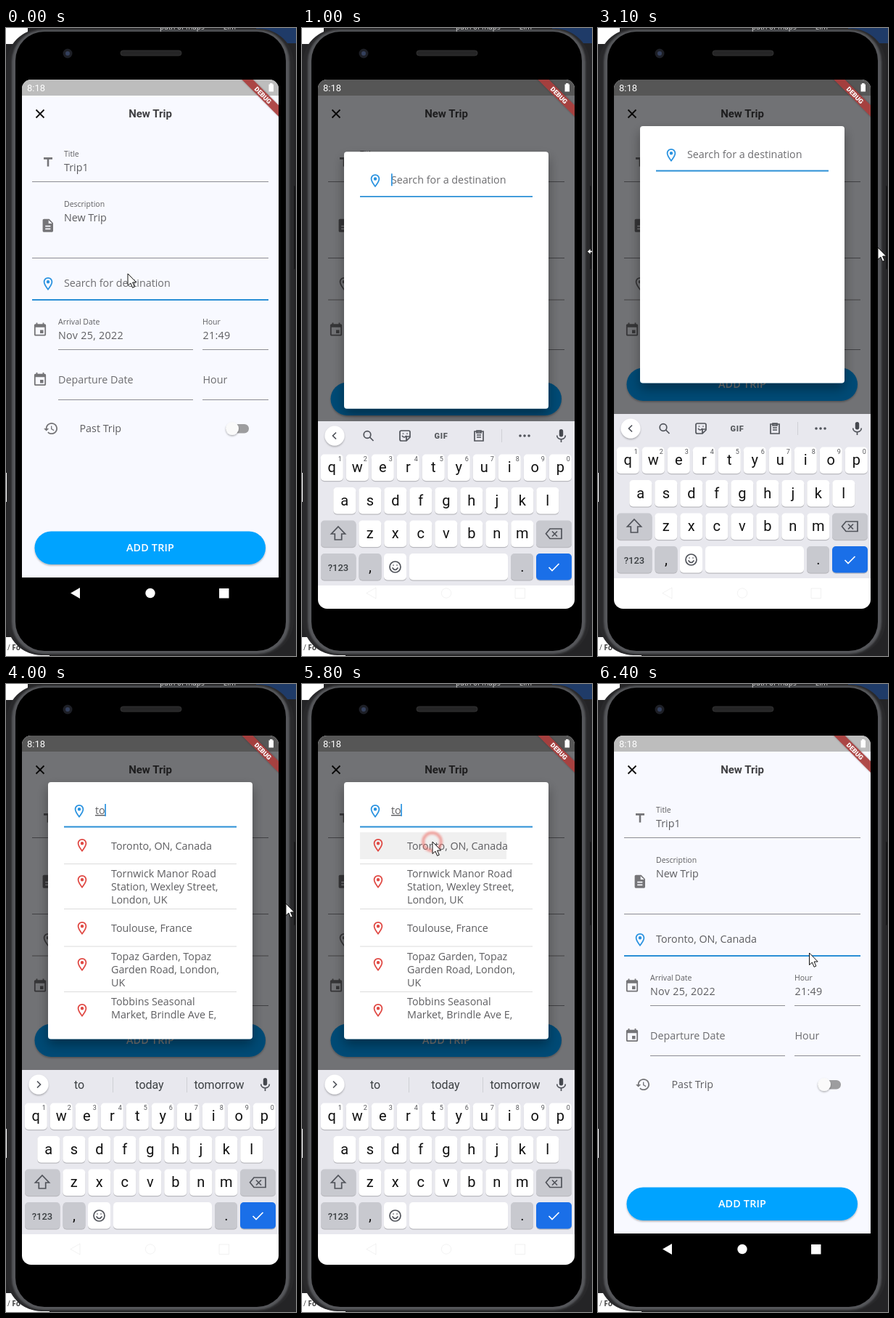
Write an HTML page that moves like this. It is 400 px wide and 864 px high and loops after 8 s.

```html
<!DOCTYPE html>
<html lang="en">
<head>
<meta charset="utf-8">
<title>New Trip</title>
<style>
  html, body { margin: 0; width: 100%; height: 100%; overflow: hidden; background: #222; }
  svg { display: block; width: 100vw; height: 100vh; }
  text { font: 14.3px "Open Sans", "Noto Sans", sans-serif; fill: #5e5e61; white-space: pre; }
  .label { font-size: 10.5px; }
  .num { letter-spacing: .3px; }
  .hint { fill: #6c6c6f; }
  .mid { text-anchor: middle; }
  .title { font: 700 15px Roboto, sans-serif; fill: #3f3f42; }
  .clock { font: 13px Roboto, sans-serif; fill: #fff; }
  .debug { font: 900 9px Roboto, sans-serif; fill: #fff; }
  .cta { font-weight: 600; letter-spacing: .2px; fill: #fff; }
  .icon { fill: #757578; }
  .line { stroke: #8d8d92; stroke-width: 1; }
  .blue { fill: #2b93e0; }
  .red { fill: #e04a45; }
  .rule { stroke: #dcdcdc; }
  .key { font: 20px Roboto, sans-serif; fill: #111; }
  .digit { font: 9px Roboto, sans-serif; fill: #55565a; }
  .small { font: 500 13px Roboto, sans-serif; fill: #3c4043; }
  .word { font: 16px Roboto, sans-serif; fill: #3c4043; }
  .gif { font: 900 11px Roboto, sans-serif; fill: #55585c; }
  .draw { fill: none; stroke: #50535a; stroke-width: 1.7; }
</style>
</head>
<body>
<svg viewBox="0 0 400 864" preserveAspectRatio="none">
  <defs>
    <clipPath id="screen"><rect x="22" y="71" width="354" height="728" rx="12.500"/></clipPath>
    <clipPath id="formClip"><rect id="formBox" x="22" y="93" width="354" height="582"/></clipPath>
    <clipPath id="listClip"><rect x="58" y="198" width="282" height="266"/></clipPath>
    <filter id="soft" x="-30%" y="-30%" width="160%" height="160%"><feGaussianBlur stdDeviation="1"/></filter>
    <filter id="lift" x="-15%" y="-15%" width="130%" height="140%">
      <feDropShadow dx="0" dy="8" stdDeviation="8" flood-opacity=".35"/>
    </filter>
    <filter id="low" x="-20%" y="-20%" width="140%" height="160%">
      <feDropShadow dx="0" dy="1.5" stdDeviation="1.2" flood-opacity=".3"/>
    </filter>
    <path id="pin" transform="scale(.9) translate(-12 -12)" fill-rule="evenodd" d="M12 2C8.1 2 5 5.1 5 9c0 5.25 7 13 7 13s7-7.75 7-13c0-3.9-3.1-7-7-7zM7 9c0-2.8 2.2-5 5-5s5 2.2 5 5c0 2.9-2.9 7.2-5 9.9C9.9 16.2 7 11.85 7 9zM12 6.5a2.5 2.5 0 1 0 0 5 2.5 2.5 0 0 0 0-5z"/>
    <path id="cal" transform="scale(.9) translate(-12 -11.5)" d="M17 12h-5v5h5zM16 1v2H8V1H6v2H5c-1.1 0-2 .9-2 2v14c0 1.1.9 2 2 2h14c1.1 0 2-.9 2-2V5c0-1.1-.9-2-2-2h-1V1zm3 18H5V8h14z"/>
  </defs>

  <!-- desktop and phone -->
  <rect width="400" height="864" fill="#242426"/>
  <path fill="#fff" d="M0 0H30V22H0zM0 612H4V652H0zM0 838H60V864H0z"/>
  <path fill="#1f3b68" d="M345 0H400V21H345z"/>
  <text x="2" y="856" style="font-size:10px;fill:#444">/ <tspan font-weight="700">Fo</tspan></text>
  <rect x="394" y="217" width="5" height="115" rx="2" fill="#151516"/>
  <rect x="1" y="1" width="396" height="862" rx="48" fill="#29292b"/>
  <rect x="8" y="2.500" width="383" height="858.500" rx="44" fill="#55565a" filter="url(#soft)"/>
  <rect x="13" y="5" width="373" height="852" rx="40"/>
  <text x="212" y="2" style="font-size:10px;fill:#ddd">path of maps          Elm</text>
  <circle cx="85" cy="35" r="6.500" fill="#1d1f26"/><circle cx="85" cy="35" r="3" fill="#34405c"/>
  <rect x="158" y="31" width="84" height="7" rx="3.500" fill="#252526" stroke="#333"/>

  <g clip-path="url(#screen)">
    <path d="M22 71H376V799H22z"/>
    <path fill="#f8f9ff" d="M22 71H376V756H22z"/>
    <path fill="#bdbdbd" d="M22 71H376V93H22z"/>
    <path d="M41.500 112.500l11 11m0-11l-11 11" stroke="#111" stroke-width="1.800"/>
    <text class="title mid" x="199" y="123">New Trip</text>

    <g clip-path="url(#formClip)">
      <path class="icon" d="M52 178H64V180.700H59.300V190.500H56.700V180.700H52z"/>
      <path class="icon" transform="translate(47 261) scale(.9)" d="M14 2H6c-1.100 0-2 .9-2 2v16c0 1.100.9 2 2 2h12c1.100 0 2-.9 2-2V8zm2 16H8v-2h8zm0-4H8v-2h8zm-3-5V3.500L18.500 9z"/>
      <use id="fieldPin" href="#pin" x="58" y="352"/>
      <use href="#cal" class="icon" x="47" y="415"/>
      <use href="#cal" class="icon" x="47" y="483.500"/>
      <path class="icon" transform="translate(51.200 540.200) scale(.9)" d="M13 3c-5 0-9 4-9 9H1l3.900 3.900.1.100L9 12H6c0-3.900 3.100-7 7-7s7 3.100 7 7-3.100 7-7 7c-1.900 0-3.700-.8-4.900-2.100l-1.400 1.400C8.300 20 10.500 21 13 21c5 0 9-4 9-9s-4-9-9-9zm-1 5v5l4.300 2.500.7-1.200-3.500-2.100V8z"/>
      <text class="label" x="80" y="177">Title</text>
      <text x="80" y="197">Trip1</text>
      <text class="label" x="80" y="246">Description</text>
      <text x="80" y="266">New Trip</text>
      <text id="place" x="80" y="356"></text>
      <text class="label" x="72" y="408">Arrival Date</text>
      <text class="num" x="72" y="428">Nov 25, 2022</text>
      <text class="label" x="271" y="408">Hour</text>
      <text class="num" x="271.500" y="428">21:49</text>
      <text class="hint" x="72" y="489">Departure Date</text>
      <text class="hint" x="271.500" y="489">Hour</text>
      <text x="101.500" y="556">Past Trip</text>
      <path class="line" d="M36 211.500H362M36 316.500H362M72 442.500H258M271 442.500H362M72 511.500H258M271 511.500H362"/>
      <path id="placeLine" d="M36 374H362"/>
      <rect x="303" y="545" width="32" height="12.500" rx="6.200" fill="#9d9d9f"/>
      <circle cx="312" cy="551" r="9" fill="#fafafa" filter="url(#low)"/>
    </g>
    <g id="cta">
      <rect x="39.500" y="692.500" width="318.500" height="45.500" rx="22.700" fill="#05a3ff" filter="url(#low)"/>
      <text class="cta mid" x="199" y="720">ADD TRIP</text>
    </g>

    <path id="scrim" d="M22 71H376V756H22z"/>
    <text class="clock" x="29" y="87">8:18</text>
    <path fill="#fff" d="M362.500 77.500H364V76H367.500V77.500H369V87.500H362.500z"/>
    <g transform="translate(354.500 92.500) rotate(45)">
      <rect x="-50" y="-5.400" width="100" height="10.800" opacity=".3" filter="url(#soft)"/>
      <rect x="-50" y="-5.400" width="100" height="10.800" fill="#b0403f" opacity=".9"/>
      <text class="debug mid" y="3.200">DEBUG</text>
    </g>

    <g id="dialog">
      <rect x="58" y="135" width="282" height="353.500" rx="4" fill="#fff" filter="url(#lift)"/>
      <use id="queryPin" href="#pin" x="101" y="175"/>
      <text id="query" x="123" y="179"></text>
      <path d="M80 196.500H318" stroke="#2b8fd6" stroke-width="1.800"/>
      <rect id="caret" class="blue" y="165" width="1.700" height="17"/>
      <g id="list" clip-path="url(#listClip)"><rect id="press" x="80" y="204" width="202" height="37" opacity=".06"/></g>
    </g>

    <g id="board">
      <path fill="#e8e8ee" d="M22 531H376V757H22z"/>
      <path fill="#fff" d="M22 757H376V1060H22z"/>
      <circle cx="45" cy="551" r="13.500" fill="#fff" filter="url(#low)"/>
      <path id="chevron" class="draw" d="M47 546.500l-4.500 4.500 4.500 4.500"/>
      <g id="tools">
        <g class="draw">
          <circle cx="90" cy="549.500" r="4.800"/><path d="M93.500 553l5 5"/>
          <path d="M137 544h10q2 0 2 2v7l-5 5h-7q-2 0-2-2v-10q0-2 2-2zM149 552h-5v6M138.500 551.500q2.500 3 5 0M139.500 548h.01M145 548h.01" stroke-linecap="round"/>
          <path d="M238 545h12v13h-12zM241 544h6v3h-6zM241 550h6M241 553h6"/>
        </g>
        <text class="gif mid" x="192" y="555" letter-spacing=".8">GIF</text>
        <path d="M275.500 542V560" stroke="#cfd0d5"/>
        <path d="M301 551h.01m6 0h.01m6 0h.01" stroke="#50535a" stroke-width="3.600" stroke-linecap="round"/>
      </g>
      <g id="words">
        <path d="M147.500 541V562M249.500 541V562" stroke="#cfd0d5"/>
        <text class="word mid" x="101" y="557"></text>
        <text class="word mid" x="198" y="557"></text>
        <text class="word mid" x="294" y="557"></text>
      </g>
      <rect x="354.800" y="542" width="5.400" height="10.500" rx="2.700" fill="#45484e"/>
      <path class="draw" d="M351.700 550.500c0 7 11.600 7 11.600 0M357.500 556v4"/>
      <g id="keys"></g>
      <g class="draw">
        <path d="M50 676l9.500 10h-4.800v8h-9.400v-8h-4.800z"/>
        <path d="M342 679h16v13.500h-16l-5.500-6.700zM345 682.500l7 7m0-7l-7 7"/>
        <circle cx="128.500" cy="731.500" r="7.500"/><path d="M125 733q3.500 5 7 0M126 729h.01M131 729h.01" stroke-linecap="round"/>
        <path d="M340.500 732l4.500 4.500 9.500-9.500" stroke="#fff"/>
      </g>
      <text class="small mid" x="50" y="737">?123</text>
      <text class="key mid" x="94" y="738">,</text>
      <text class="key mid" x="304" y="738">.</text>
    </g>

    <g fill="#fff" stroke="rgba(0,0,0,.07)" stroke-width=".8">
      <path d="M89 777.500L102 770V785z"/><circle cx="199" cy="777.500" r="6.700"/><path d="M294 771H307.500V784.500H294z"/>
    </g>
  </g>

  <g id="ring" fill="none" stroke="#ee6a64" filter="url(#soft)">
    <circle stroke-width="6" opacity=".3"/><circle stroke-width="2.500" opacity=".5"/>
  </g>
  <path id="resize" d="M393.500 307.500l4.500-4v2.800h4v2.400h-4v2.800z" fill="#fff" stroke="#000" stroke-width=".6"/>
  <path id="mouse" d="M0 0V16.500L3.900 13L6.600 19.300L9.300 18.100L6.600 12H11.700z" fill="#fff" stroke="#111"/>
</svg>
<script>
const LOOP = 8000, TICK = 100;
const $ = id => document.getElementById(id);
const set = (el, attrs) => { for (const k in attrs) el.setAttribute(k, attrs[k]); };
const add = (parent, tag, attrs, content = '') => {
  const el = document.createElementNS('http://www.w3.org/2000/svg', tag);
  set(el, attrs);
  el.textContent = content;
  parent.append(el);
  return el;
};
const show = (el, on) => set(el, { visibility: on ? 'visible' : 'hidden' });

// Keyboard
const keys = $('keys');
function addKey(x, y, w, fill) {
  add(keys, 'rect', { x, y: y + 1.2, width: w, height: 36.5, rx: 5, fill: 'rgba(0,0,0,.2)' });
  add(keys, 'rect', { x, y, width: w, height: 36.5, rx: 5, fill });
}
const GREY = '#c8c9cf';
[['qwertyuiop', 41.3, 576.5], ['asdfghjkl', 58.8, 622], ['zxcvbnm', 93.8, 667.5]].forEach(([row, x0, y], r) => {
  [...row].forEach((ch, i) => {
    const x = x0 + i * 35;
    addKey(x - 15.5, y, 31, '#fff');
    add(keys, 'text', { class: 'key mid', x, y: y + 24.5 }, ch);
    if (!r) add(keys, 'text', { class: 'digit mid', x: x + 11, y: y + 9.5 }, (i + 1) % 10);
  });
});
addKey(26, 667.5, 48.5, GREY);
addKey(323, 667.5, 49, GREY);
[[26, 48.5, GREY], [78.5, 31, GREY], [113, 31, '#fff'], [148, 136, '#fff'], [288, 31, GREY], [323, 49, '#1a6fe8']]
  .forEach(([x, w, fill]) => addKey(x, 713, w, fill));

// Suggestions: first baseline, pin centre, rule below, lines
const list = $('list');
[
  [228, 222, 247.5, 'Toronto, ON, Canada'],
  [266, 272, 309.5, 'Tornwick Manor Road|Station, Wexley Street,|London, UK'],
  [341, 336, 361, 'Toulouse, France'],
  [379.5, 386, 423.5, 'Topaz Garden, Topaz|Garden Road, London,|UK'],
  [442, 449, 490, 'Tobbins Seasonal|Market, Brindle Ave E,'],
].forEach(([y, pinY, ruleY, lines]) => {
  add(list, 'use', { href: '#pin', class: 'red', x: 105, y: pinY });
  lines.split('|').forEach((s, i) => add(list, 'text', { x: 145, y: y + i * 18 }, s));
  add(list, 'path', { class: 'rule', d: `M80 ${ruleY}H318` });
});

// Tracks are [time, value, time, value, ...], linear in between
function at(track, t) {
  const n = track.length;
  if (t <= track[0]) return track[1];
  for (let i = 2; i < n; i += 2) {
    if (t <= track[i]) {
      const p = (t - track[i - 2]) / (track[i] - track[i - 2]);
      return track[i - 1] + (track[i + 1] - track[i - 1]) * p;
    }
  }
  return track[n - 1];
}
const tracks = {
  scrim: [400, 0, 500, .2, 700, .54, 5900, .54, 6000, .4, 6100, .2, 6200, 0],
  fade: [400, 0, 500, .35, 700, .95, 800, .985, 900, 1, 5900, 1, 6000, .75, 6100, .3, 6200, 0],
  dialogY: [800, 247.3, 900, 230, 1000, 170.3, 1100, 145, 1200, 137, 1300, 135],
  boardY: [700, 799, 800, 787.5, 900, 645, 1000, 541, 1100, 533, 1200, 531, 5900, 531, 6000, 545, 6100, 593, 6200, 740, 6300, 800],
  ctaY: [800, 693, 900, 650, 1000, 488, 1100, 474, 1200, 469, 1300, 468, 6100, 468, 6200, 530, 6300, 660, 6400, 693],
  mouseX: [0, 168, 200, 197, 400, 197, 700, 394, 1900, 394, 2200, 386, 5000, 386, 5100, 370, 5500, 180, 5800, 180, 6100, 282, 6400, 291.5],
  mouseY: [0, 338, 200, 351, 400, 351, 700, 307, 1900, 307, 2200, 302, 5000, 302, 5100, 296, 5500, 217, 5800, 217, 6100, 351, 6400, 370],
};
const taps = [
  { x: 197, y: 351, r: [300, 7, 700, 21], fade: [300, 1, 900, .7], end: 900 },
  { x: 179.5, y: 217, r: [5700, 7, 6000, 23], fade: [5700, 1, 6200, .6], end: 6200 },
];
const within = (t, a, b) => t >= a && t < b;

function render(t) {
  const v = {};
  for (const k in tracks) v[k] = at(tracks[k], t);

  // Form
  const chosen = t >= 6000;
  $('place').textContent = chosen ? 'Toronto, ON, Canada' : 'Search for destination';
  $('place').setAttribute('class', chosen ? '' : 'hint');
  $('fieldPin').setAttribute('class', within(t, 500, 6000) ? 'icon' : 'blue');
  const thin = within(t, 500, 6200);
  set($('placeLine'), { stroke: thin ? '#8d8d92' : '#2b8fd6', 'stroke-width': thin ? 1.2 : 2 });
  set($('formBox'), { height: v.ctaY - 18 - 93 });
  set($('cta'), { transform: `translate(0 ${v.ctaY - 693})` });
  set($('scrim'), { opacity: v.scrim });

  // Dialog
  const typed = t < 3500 ? '' : t < 3700 ? 't' : 'to';
  const picked = t >= 5900;
  set($('dialog'), { opacity: v.fade, transform: `translate(0 ${v.dialogY - 135})` });
  const query = $('query');
  query.textContent = picked ? 'Toronto, ON, Canada' : typed || 'Search for a destination';
  query.setAttribute('class', typed ? '' : 'hint');
  query.setAttribute('text-decoration', typed && !picked ? 'underline' : 'none');
  $('queryPin').setAttribute('class', picked ? 'icon' : 'blue');
  const blinkOn = [[600, 1100], [1600, 2100], [2600, 3100], [3500, 5000], [5500, 5900]];
  show($('caret'), blinkOn.some(([a, b]) => within(t, a, b)));
  set($('caret'), { x: 123 + typed.length * 6.6 });
  show(list, t >= 4000);
  show($('press'), t >= 5800);

  // Keyboard
  set($('board'), { transform: `translate(0 ${v.boardY - 531})` });
  const boardOn = within(t, 800, 6300);
  show($('board'), boardOn);
  show($('tools'), boardOn && t < 3500);
  show($('words'), within(t, 3500, 5900));
  const words = typed === 't' ? ['t', 'the', 'to'] : ['to', 'today', 'tomorrow'];
  $('words').querySelectorAll('text').forEach((el, i) => { el.textContent = words[i]; });
  set($('chevron'), { transform: t < 3500 ? '' : 'rotate(180 45 551)' });

  // Pointer
  const tap = taps.find(p => within(t, p.r[0], p.end));
  show($('ring'), !!tap);
  if (tap) {
    set($('ring'), { opacity: at(tap.fade, t) });
    for (const c of $('ring').children) set(c, { cx: tap.x, cy: tap.y, r: at(tap.r, t) });
  }
  const resizing = within(t, 700, 2000);
  show($('resize'), resizing);
  show($('mouse'), !resizing);
  set($('mouse'), { transform: `translate(${v.mouseX} ${v.mouseY})` });
}

const start = performance.now();
function loop() {
  const t = (performance.now() - start) % LOOP;
  render(Math.floor(t / TICK) * TICK);
  requestAnimationFrame(loop);
}
loop();
</script>
</body>
</html>
```
